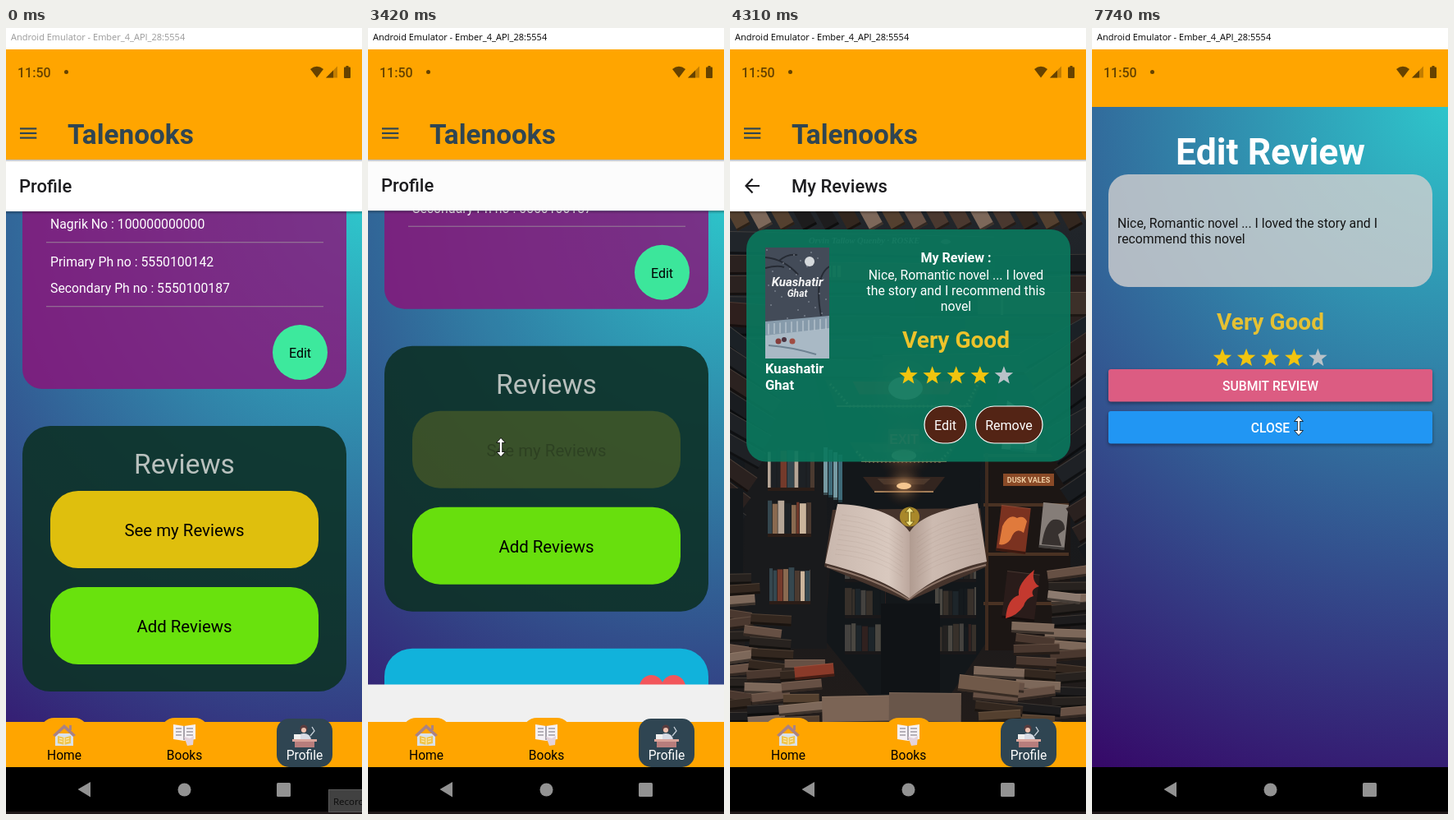
An HTML page with a canvas that plays this animation: 434x956 px, repeating every 8 s.

```html
<!DOCTYPE html>
<html lang="en">
<head>
<meta charset="utf-8">
<title>Book reviews app</title>
<style>
  html, body { margin: 0; width: 100%; height: 100%; overflow: hidden; background: #000; }
  canvas { display: block; width: 100vw; height: 100vh; }
</style>
</head>
<body>
<canvas id="stage" width="434" height="956"></canvas>
<script>
const LOOP = 8000, W = 434;
const stage = document.getElementById('stage').getContext('2d');
let c = stage;

const clamp = v => Math.max(0, Math.min(1, v));
const ramp = (t, from, to) => clamp((t - from) / (to - from));
const easeOut = u => 1 - (1 - u) ** 3;

// Piecewise interpolation through [time, ...values]
function track(keys, t) {
  if (t <= keys[0][0]) return keys[0].slice(1);
  for (let i = 1; i < keys.length; i++) {
    const a = keys[i - 1], b = keys[i];
    if (t < b[0]) {
      const u = ramp(t, a[0], b[0]), s = u * u * (3 - 2 * u);
      return a.slice(1).map((v, k) => v + (b[k + 1] - v) * s);
    }
  }
  return keys[keys.length - 1].slice(1);
}

function rect(x, y, w, h, fill) { c.fillStyle = fill; c.fillRect(x, y, w, h); }
function box(x, y, w, h, r, fill, stroke) {
  c.beginPath(); c.roundRect(x, y, w, h, r);
  c.fillStyle = fill; c.fill();
  if (stroke) { c.strokeStyle = stroke; c.lineWidth = 1.2; c.stroke(); }
}
function disc(x, y, rx, fill, ry = rx) {
  c.beginPath(); c.ellipse(x, y, rx, ry, 0, 0, 7); c.fillStyle = fill; c.fill();
}
function shape(d, fill) { c.fillStyle = fill; c.fill(new Path2D(d)); }
function line(d, stroke, width = 1) {
  c.strokeStyle = stroke; c.lineWidth = width; c.stroke(new Path2D(d));
}
function text(s, x, y, size, fill, { weight = 400, align = 'left', family = 'Roboto, Arial, sans-serif' } = {}) {
  c.font = `${weight} ${size}px ${family}`;
  c.textAlign = align; c.fillStyle = fill; c.fillText(s, x, y);
}
const centered = (s, x, y, size, fill, weight = 400) => text(s, x, y, size, fill, { weight, align: 'center' });
function layer(draw, { x = 0, y = 0, angle = 0, alpha = 1, clip } = {}) {
  c.save();
  if (clip) { c.beginPath(); c.rect(...clip); c.clip(); }
  c.translate(x, y); c.rotate(angle); c.globalAlpha *= alpha;
  draw();
  c.restore();
}
function shade(y, h = 4, alpha = .3) {
  const g = c.createLinearGradient(0, y, 0, y + h);
  g.addColorStop(0, `rgba(0,0,0,${alpha})`); g.addColorStop(1, 'rgba(0,0,0,0)');
  rect(0, y, W, h, g);
}
function glow(x, y, r, color) {
  const g = c.createRadialGradient(x, y, 0, x, y, r);
  g.addColorStop(0, color); g.addColorStop(1, 'rgba(60,20,10,0)');
  disc(x, y, r, g);
}
function backdrop(top, bottom, radius) {
  const g = c.createRadialGradient(W, top, 0, W, top, radius);
  g.addColorStop(0, '#2ec5cb'); g.addColorStop(1, '#360868');
  rect(0, top, W, bottom - top, g);
}

// Bookshop interior, painted once
const photo = document.createElement('canvas');
photo.width = W; photo.height = 621;

function paintPhoto() {
  c = photo.getContext('2d');
  c.translate(0, -223);
  let seed = 11;
  const rnd = () => (seed = seed * 16807 % 2147483647) / 2147483647;
  const pick = list => list[Math.floor(rnd() * list.length)];
  const dark = ['#1e2125', '#2a211f', '#1b2126', '#2b2220', '#191c20', '#15181c'];
  const worn = ['#4a382f', '#665044', '#33271f', '#54402f', '#27221f', '#7d685a', '#1d1c1d'];
  const spines = ['#8a6a50', '#b5a596', '#743a2b', '#35474f', '#cbb59c', '#4b3a30', '#1d2125'];
  const slab = (x, y, w, h, angle, fill) => layer(() => {
    rect(0, 0, w, h, fill);
    rect(0, h - 3, w, 3, 'rgba(0,0,0,.5)');
    rect(0, 0, w, 1, 'rgba(220,190,160,.16)');
  }, { x, y, angle });
  const row = (x, y, w, h) => {
    for (let p = x; p < x + w; ) {
      const bw = 3 + rnd() * 6, bh = h * (.85 + rnd() * .15);
      rect(p, y + h - bh, Math.min(bw, x + w - p), bh, pick(spines));
      p += bw + .6;
    }
    rect(x, y + h, w, 4, '#2b1d17');
  };
  const stack = (x, top, w) => {
    for (let y = top; y < 850; y += 14)
      slab(x + rnd() * 10 - 5, y, w * (.85 + rnd() * .3), 13, (rnd() - .5) * .3, pick(worn));
  };

  const base = c.createLinearGradient(0, 223, 0, 844);
  base.addColorStop(0, '#22262b'); base.addColorStop(.5, '#14181c'); base.addColorStop(1, '#221c1a');
  rect(0, 223, W, 621, base);

  // Layered books overhead
  for (let y = 276; y < 425; y += 25)
    for (let x = -20; x < W; ) {
      const w = 90 + rnd() * 130;
      slab(x, y, w, 24, (rnd() - .5) * .04, pick(dark));
      x += w;
    }
  for (let x = -10; x < W; x += 27) slab(x, 212, 18, 40, -.5, pick(worn));
  slab(0, 247, 322, 28, .02, '#20252a');
  text('Orvin Tallow Quenby · ROSKE', 96, 262, 10.5, '#9b9892', { weight: 'italic 700', family: 'Liberation Serif, serif' });
  disc(263, 260, 6, '#6d6c69', 3);
  slab(60, 284, 190, 25, .01, '#3d2621');
  for (let i = 0; i < 5; i++) rect(107 + i * 6, 289, 4, 14, '#7d6351');
  slab(302, 321, 132, 30, 0, '#3c3029');
  rect(330, 321, 3, 28, '#75604d');
  slab(0, 333, 92, 30, .08, '#2e1f1d');
  slab(186, 398, 130, 28, -.02, '#2b2523');

  // Corridor, ceiling panels and lamps
  shape('M104 426H330L304 540 314 745 268 812H170L116 745 130 540Z', '#13171a');
  [[434, 96, 26], [510, 66, 17], [552, 50, 12]].forEach(([y, half, h], i) => {
    shape(`M${212 - half} ${y - 6}H${212 + half}L${212 + half - 14} ${y + h}H${212 - half + 14}Z`, '#33251f');
    shape(`M${212 - half * .65} ${y - 4}h${half * 1.3}l-8 ${h * .6}h${16 - half * 1.3}Z`, i ? '#4b382c' : '#96261c');
    line(`M${212 - half + 14} ${y + h}H${212 + half - 14}`, '#a37e58', 2);
    glow(212, y + 4, half * .55, 'rgba(255,190,120,.5)');
  });
  c.setLineDash([2, 3]);
  line('M122 433L146 460H288L304 430M154 515L166 527H256L270 512', '#b28b5e', 3);
  c.setLineDash([]);
  disc(214, 438, 21, '#ffe9d0', 14);
  disc(212, 520, 15, '#ffdfb8', 7);
  disc(212, 557, 9, '#f5c690', 4);
  glow(212, 500, 36, 'rgba(230,50,30,.5)');
  rect(193, 488, 38, 24, '#72332c');
  text('EXIT', 212, 506, 16, '#ff5a48', { weight: 700, align: 'center', family: 'Liberation Sans, sans-serif' });

  // Shelves
  rect(18, 505, 100, 250, '#191a1c');
  [[46, 511, 57, 48], [46, 574, 53, 41], [48, 655, 50, 42]].forEach(r => row(...r));
  for (let i = 0; i < 4; i++) slab(114 + i * 6, 510 + i * 3, 5, 58, 0, i % 2 ? '#3e6a78' : '#7599a2');
  c.globalAlpha = .3;
  for (let y = 592; y < 750; y += 44) { row(140, y, 50, 34); row(250, y, 50, 34); }
  c.globalAlpha = 1;
  rect(184, 700, 72, 110, '#101316');
  rect(311, 517, 104, 240, '#1c1614');
  for (let y = 518; y < 740; y += 60) rect(309, y, 104, 4, '#4a3223');
  rect(311, 517, 4, 240, '#402b1f');
  rect(333, 542, 62, 15, '#8a4a27');
  text('DUSK VALES', 364, 553, 9, '#efcfa5', { weight: 700, align: 'center' });
  slab(331, 580, 36, 56, .12, '#7b3220');
  shape('M332 606q8-16 18-10 8-4 12 4l-4 14q-10-8-16 8-6 8-14 6Z', '#e07a3c');
  slab(382, 577, 31, 55, .1, '#857d78');
  shape('M380 628q4-26 14-30 14-2 14 12l-8 6 4 14Z', '#37312f');
  slab(338, 660, 40, 58, .12, '#2a1c1a');
  shape('M336 718q2-24 16-28-2-14 19-31-4 14 6 20-12 4-7 12-9 2-12 12-8 12-22 15Z', '#c4392f');
  shape('M331 512L338 453 361 468 357 514Z', '#c4bbb0');
  slab(344, 490, 16, 24, .1, '#5d8192');
  slab(360, 498, 15, 18, .1, '#a58e7a');

  // Tilted books framing the corridor
  for (let i = 0; i < 12; i++) {
    const y = 345 + i * 27, reach = 118 - i * 8;
    slab(-24, y, reach, 22, .5 + rnd() * .15, pick(dark));
    slab(W + 24 - reach * .9, y + reach * .43, reach, 22, -.5 - rnd() * .12, pick(dark));
  }
  rect(0, 560, 16, 110, '#14171a');

  // Loose piles on both sides
  [[-12, 664, 40], [22, 712, 46], [62, 768, 50]].forEach(p => stack(...p));
  [[388, 660, 54], [345, 722, 52], [300, 776, 54]].forEach(p => stack(...p));
  slab(78, 777, 48, 16, -.1, '#8a3a29');
  slab(388, 684, 40, 12, .12, '#8b7a6f');
  slab(112, 813, 168, 34, -.02, '#7b6455');
  slab(194, 808, 88, 38, .01, '#69564a');
  slab(280, 786, 74, 20, .12, '#705949');

  // Open book
  shape('M125 586L115 655 217 697 313 655 305 584Z', '#46342c');
  const left = c.createLinearGradient(116, 0, 219, 0), right = c.createLinearGradient(219, 0, 313, 0);
  left.addColorStop(0, '#c9b7ad'); left.addColorStop(.75, '#d9c9bf'); left.addColorStop(1, '#bca79d');
  right.addColorStop(0, '#b09b90'); right.addColorStop(.3, '#cdbbb1'); right.addColorStop(1, '#bfaca2');
  shape('M131 579C168 580 203 590 219 613V694C190 672 150 660 116 651Z', left);
  shape('M302 578C262 585 232 593 219 613V694C244 671 280 656 313 649Z', right);
  for (let i = 0; i < 9; i++) {
    line(`M${136 - i} ${592 + i * 6}Q180 ${596 + i * 6} 211 ${620 + i * 6}`, 'rgba(100,75,65,.08)');
    line(`M${298 + i} ${591 + i * 6}Q252 ${600 + i * 6} 228 ${620 + i * 6}`, 'rgba(100,75,65,.07)');
  }
  line('M118 655Q178 670 218 695Q252 668 312 653', '#8d7568', 2);
  c = stage;
}

function stars(firstX, y) {
  for (let i = 0; i < 5; i++) {
    c.beginPath();
    for (let k = 0; k < 10; k++) {
      const a = -Math.PI / 2 + k * Math.PI / 5, r = k % 2 ? 5 : 11.8;
      c.lineTo(firstX + i * 29.1 + r * Math.cos(a), y + 1 + r * Math.sin(a));
    }
    c.fillStyle = i < 4 ? '#f1c40f' : '#b9c2c8';
    c.fill();
  }
}

function windowFrame(t) {
  rect(0, 0, W, 26, '#fff');
  text('Android Emulator - Ember_4_API_28:5554', 6, 15, 11, t < 730 ? '#999' : '#000', { family: '"Open Sans", sans-serif' });
}

function statusBar() {
  const ink = '#664200';
  rect(0, 26, W, 70, '#ffa500');
  text('11:50', 14, 60, 16, ink, { weight: 500 });
  disc(73.5, 53.5, 2.5, ink);
  shape('M371 50Q379 43.500 387 50L379 60.500Z', ink);
  shape('M390 60.500L404 46.500V60.500Z', 'rgba(102,66,0,.4)');
  shape('M390 60.500L399 51.500V60.500Z', ink);
  box(412, 47.5, 8, 13.5, 1, ink);
  rect(414.5, 46, 3, 2, ink);
}

function appBar() {
  rect(0, 95, W, 65, '#ffa500');
  for (let i = 0; i < 3; i++) rect(17, 121.3 + i * 5.6, 20.3, 2.2, '#2f4552');
  text('Talenooks', 75, 141, 33.3, '#2f4552', { weight: 700 });
  shade(160, 3, .3);
}

function header(title, back) {
  rect(0, 160, W, 63, '#fff');
  text(title, back ? 75 : 16, 200, 22, '#1c1c1f', { weight: 500 });
  if (back) line('M36 192H20M27.500 183.500L19.500 192L27.500 200.500', '#1c1c1f', 2.2);
}

function profileContent(shift, pressed) {
  const white = '#fff';
  box(20, 100, 395, 339, 24, 'rgba(140,17,122,.8)');
  text('Nagrik No : 100000000000', 54, 244, 15.8, white);
  text('Primary Ph no : 5550100142', 54, 290, 15.8, white);
  text('Secondary Ph no : 5550100187', 54, 322, 15.8, white);
  rect(49, 260, 338, 1.3, 'rgba(160,145,155,.65)');
  rect(49, 338, 338, 1.3, 'rgba(160,145,155,.65)');
  disc(358.5, 394.5, 33.5, '#3de99d');
  centered('Edit', 358.5, 401, 16, '#000');

  box(20, 484, 395, 323, 34, 'rgba(14,50,40,.91)');
  centered('Reviews', 217.5, 542, 33.5, '#b9c1be');
  layer(() => {
    box(54, 563, 327, 94, 34, '#dfbf0d');
    centered('See my Reviews', 217.5, 618, 20.4, '#000');
  }, { alpha: 1 - .8 * pressed });
  box(54, 680, 327, 94, 34, '#69e20d');
  centered('Add Reviews', 217.5, 735, 20.4, '#000');

  box(20, 852, 395, 200, 34, '#11b4de');
  text('My Wishlist', 42, 915, 24, '#145a76');
  shape('M359 893C351 878 330 883 330 903C330 920 350 930 359 940C368 930 388 920 388 903C388 883 367 878 359 893Z', '#f5575c');
}

function profileScreen(t) {
  const [shift] = track([[1180, 0], [1570, 55], [1980, 96.5]], t);
  backdrop(223, 844, 860);
  layer(() => profileContent(shift, ramp(t, 2850, 3000)), { y: -shift, clip: [0, 223, W, 602] });
  const thumb = ramp(t, 1180, 1280) * (1 - ramp(t, 2390, 2690));
  rect(431.5, 415 + (shift - 55) * .457, 2.5, 275, `rgba(25,55,95,${.55 * thumb})`);
  shade(223);
  header('Profile');
}

function bookCover() {
  layer(() => {
    rect(43, 267, 78, 135, '#434b58');
    disc(97, 284, 6, '#d5d9dc');
    line('M43 279Q66 281 83 300M60 283Q70 274 82 276M121 290Q102 303 111 350M43 292Q58 288 66 291', '#262b34', 2);
    for (let i = 0; i < 26; i++) disc(45 + i * 31 % 75, 270 + i * 47 % 84, .7, '#aeb5be');
    centered('Kuashatir', 82, 314, 15, '#f4f4f4', 'italic 700');
    centered('Ghat', 82, 327, 12, '#f4f4f4', 'italic 700');
    shape('M43 367L121 358V402H43Z', '#a9b9c5');
    shape('M43 357L121 350V365L43 374Z', '#879bab');
    for (let x = 47; x < 121; x += 7) line(`M${x} ${360 - (x - 43) * .09}v13`, '#c9d3da');
    disc(59, 381, 3.5, '#843d3b'); disc(66, 379, 3, '#4b3441'); disc(76, 381, 3.5, '#a04c42');
    line('M47 386Q75 388 105 397', '#6f8392', 2);
  }, { clip: [43, 267, 78, 135] });
}

function reviewCard(pressed) {
  const white = '#fff', mid = 275.5;
  box(20, 245, 395, 282.5, 24, 'rgba(10,119,93,.92)');
  bookCover();
  text('Kuashatir', 43, 420, 16.6, white, { weight: 700 });
  text('Ghat', 43, 440, 16.6, white, { weight: 700 });
  centered('My Review :', mid, 285, 16, white, 700);
  ['Nice, Romantic novel ... I loved', 'the story and I recommend this', 'novel']
    .forEach((s, i) => centered(s, mid, 306 + i * 18.8, 15.8, white));
  centered('Very Good', mid, 389, 28, '#edc32b', 700);
  stars(217.5, 422);
  layer(() => {
    box(237, 460, 51, 45, 22.5, '#532415', white);
    centered('Edit', 262.5, 489, 16, white);
  }, { alpha: 1 - .85 * pressed });
  box(299.5, 460, 81.5, 45, 22.5, '#532415', white);
  centered('Remove', 340, 489, 16, white);
}

function reviewsScreen(t) {
  rect(0, 160, W, 684, '#f0f0f0');
  if (t > 3590) c.drawImage(photo, 0, 223);
  if (t > 4030) reviewCard(ramp(t, 7120, 7270));
  shade(223);
  header('My Reviews', true);
}

function tabBar() {
  box(41, 839, 60, 40, 18, '#ffa500');
  box(188, 839, 60, 40, 18, '#ffa500');
  rect(0, 844, W, 55, '#ffa500');
  box(330, 840, 68, 59, 15, '#2f4552');
  // Home
  rect(60, 858, 22, 15, '#d9e2ec');
  shape('M57 860L71 847L85 860L82 862L71 852L60 862Z', '#a98284');
  rect(77, 848, 3, 6, '#a98284');
  shape('M63 861L71 863L79 861V870L71 872L63 870Z', '#f0c54c');
  line('M71 863V872M65 864l4 1M65 867l4 1M77 864l-4 1M77 867l-4 1', '#fff3cf');
  // Books
  shape('M204 847L217 849L231 847V865L217 867L204 865Z', '#f5f1f5');
  line('M217 849V866M207 852h7M207 856h7M207 860h7M220 852h8M220 856h8M220 860h8', '#77727d', 1.2);
  shape('M217 862L224 864L229 861L228 872L221 873Z', '#e4d3dc');
  // Profile
  disc(363, 852, 4.5, '#5b3c3e'); disc(363, 854, 3, '#edc0ae');
  shape('M355 866Q356 858 363 858Q371 858 372 866Z', '#d7dbe4');
  line('M371 861L376 855L373 850', '#c8d1da', 1.3);
  rect(349, 865, 30, 3, '#d9a49b'); rect(352, 868, 24, 7, '#b77d7c');
  rect(351, 859, 8, 6, '#f0efee');
  centered('Home', 71, 890, 15.6, '#000');
  centered('Books', 217.5, 890, 15.6, '#000');
  centered('Profile', 364, 890, 15.6, '#fff');
}

function editScreen() {
  const mid = 217.5;
  backdrop(95, 899, 914);
  centered('Edit Review', mid, 166, 44.5, '#fff', 700);
  box(20, 178, 395, 137, 24, 'rgba(211,208,208,.8)');
  text('Nice, Romantic novel ... I loved the story and I', 31, 243, 15.8, '#151515');
  text('recommend this novel', 31, 262, 15.8, '#151515');
  centered('Very Good', mid, 367, 28, '#e5c133', 700);
  stars(159, 400.5);
  [[415, '#dc5c82', 'SUBMIT REVIEW'], [466, '#2196f3', 'CLOSE']].forEach(([y, fill, label]) => {
    c.save();
    c.shadowColor = 'rgba(0,0,0,.4)'; c.shadowBlur = 4; c.shadowOffsetY = 2;
    box(20, y, 395, 39.5, 3, fill);
    c.restore();
    centered(label, mid, y + 26, 15.7, '#fff', 500);
  });
}

function navBar(t) {
  rect(0, 899, W, 57, '#000');
  rect(0, 953, W, 3, '#1d1718');
  shape('M87.500 926L103 917V935.500Z', '#929292');
  disc(217.5, 926.5, 8, '#929292');
  box(330, 918, 17, 17, 1.5, '#929292');
  if (t < 70) {
    rect(393, 926, 41, 28, '#5a5a5a');
    rect(394, 927, 40, 26, '#414141');
    text('Record', 399, 945, 11.5, '#0c0c0c', { family: '"Open Sans", sans-serif' });
  }
}

const POINTER = [
  [730, 428, 938], [1000, 310, 560], [1180, 277, 407], [1570, 277, 352], [1980, 277, 311],
  [2320, 205, 540], [2850, 162, 510], [3800, 162, 510], [4170, 219, 560], [4550, 219, 671],
  [4850, 219, 495], [5010, 219, 580], [5120, 205, 580], [5430, 263, 669], [5690, 263, 669],
  [5900, 285, 603], [6250, 299, 792], [6510, 296, 744], [7100, 252, 484]
];
const PRESSES = [[1180, 1980], [2850, 3150], [4240, 5050], [5690, 6450], [7100, 7400]];

function pointer(t) {
  if (t < 730) return;
  const [x, y] = track(POINTER, t);
  const down = PRESSES.some(([a, b]) => t >= a && t < b);
  layer(() => {
    if (down) disc(0, 0, 12, 'rgba(185,150,42,.86)');
    const arrow = 'M0-11L4.500-6H1.200V6H4.500L0 11L-4.500 6H-1.200V-6H-4.500Z';
    line(arrow, down ? '#6d5b18' : '#111', 1.4);
    shape(arrow, down ? '#f3e588' : '#fff');
  }, { x, y });
}

function draw(t) {
  rect(0, 0, W, 956, '#000');
  const reveal = easeOut(ramp(t, 3413.6, 3740));
  if (reveal < 1) {
    layer(() => profileScreen(t), { y: -13 * reveal, clip: [0, 160, W, 684] });
    rect(0, 160, W, 684, `rgba(0,0,0,${.2 * reveal})`);
  }
  if (reveal > 0) {
    const top = 844 - 684 * reveal;
    layer(() => reviewsScreen(t), { y: 13 * (1 - reveal), clip: [0, top, W, 844 - top] });
  }
  appBar();
  tabBar();
  const slide = easeOut(ramp(t, 7540, 7740));
  if (slide > 0) layer(editScreen, { y: 804 * (1 - slide), clip: [0, 95, W, 804] });
  statusBar();
  windowFrame(t);
  navBar(t);
  pointer(t);
}

paintPhoto();
const start = performance.now();
(function tick() {
  draw((performance.now() - start) % LOOP);
  requestAnimationFrame(tick);
})();
</script>
</body>
</html>
```
